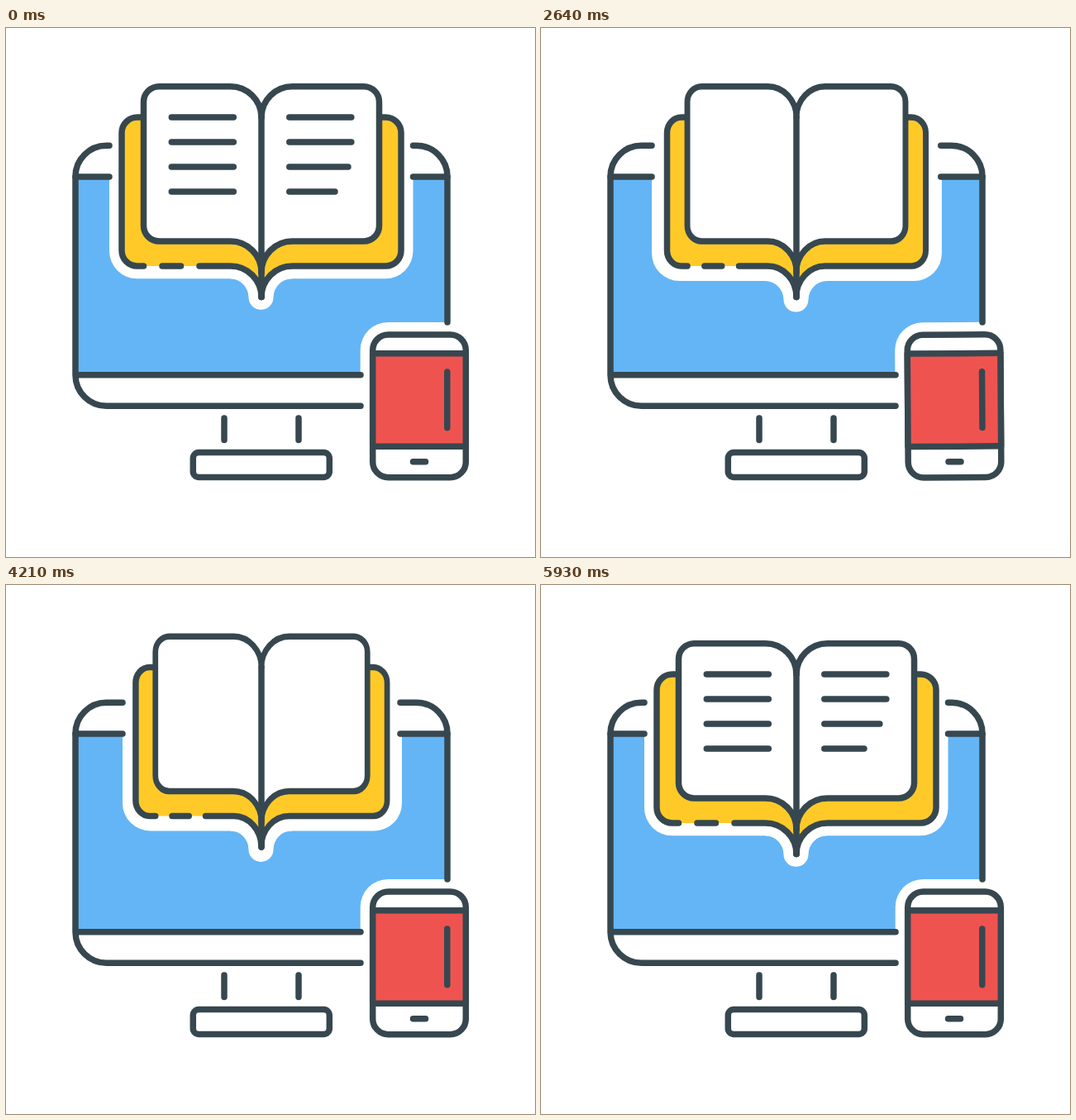
These frames come from a looping animation (640 px wide and 640 px high, 6000 ms). An HTML page without scripts:

```html
<!DOCTYPE html>
<html lang="en">
<head>
<meta charset="utf-8">
<title>Online reading</title>
<style>
  @property --hide { syntax: "<number>"; inherits: false; initial-value: 0; }
  @property --show { syntax: "<number>"; inherits: false; initial-value: 0; }

  :root { --ease: cubic-bezier(.333, 0, .667, 1); }
  html, body { margin: 0; width: 100%; height: 100%; overflow: hidden; background: #fff; }
  svg { display: block; width: 100%; height: 100%; }

  .ink { fill: none; stroke: #37474f; stroke-width: 7.5; stroke-linecap: round; stroke-linejoin: round; }
  .ink * { vector-effect: non-scaling-stroke; }
  .white { fill: #fff; }
  .yellow { fill: #ffca28; }
  .blue { fill: #64b5f6; }
  .red { fill: #ef5350; }
  .bare { stroke: none; }

  .lift, .squeeze, .halo, .halo rect, .bezel, .phone { animation: 6s var(--ease) infinite; }
  .lift { animation-name: lift; }
  .squeeze { animation-name: squeeze; }
  .halo { animation-name: halo-lift; }
  .halo rect { animation-name: halo-squeeze; }
  .bezel { animation-name: bezel; }
  .phone { animation-name: wiggle; }

  @keyframes lift {
    0%, 59.33%, 81.33%, 100% { translate: 0 0; }
    70.83%, 71.67% { translate: 0 -8.6px; }
  }
  @keyframes squeeze {
    0%, 37.92%, 83.5%, 100% { scale: 1 1; }
    47.08%, 74.33% { scale: .9 1; }
  }
  @keyframes halo-lift {
    0%, 39.05%, 80.83%, 100% { translate: 0 0; }
    48.2%, 59.33% { translate: 0 5px; }
    70.83%, 71.67% { translate: 0 -6px; }
  }
  @keyframes halo-squeeze {
    0%, 39.05%, 80.83%, 100% { x: 125px; width: 367.5px; }
    48.2%, 71.67% { x: 141px; width: 338px; }
  }
  @keyframes bezel {
    0%, 39.05%, 84%, 100% { d: path("M84 180A37.5 37.5 0 0 1 121.5 142.2H125M84 180H125M534 180A37.5 37.5 0 0 0 496.5 142.2H492.5M534 180H492.5"); }
    48.2%, 74.83% { d: path("M84 180A37.5 37.5 0 0 1 121.5 142.2H141M84 180H141M534 180A37.5 37.5 0 0 0 496.5 142.2H477M534 180H477"); }
  }
  @keyframes wiggle {
    0%, 43.08%, 69.67%, 100% { rotate: 0deg; }
    48.4%, 59.03% { rotate: -5deg; }
    53.72%, 64.35% { rotate: 5deg; }
  }

  /* Text lines: wiped away from the left, later drawn again from the left */
  .text line {
    stroke-dasharray: 1px 3px;
    stroke-dashoffset: calc((var(--show) - var(--hide)) * 1px);
    animation: hide 6s var(--ease) infinite, show 6s var(--ease) infinite;
    animation-delay: calc(var(--out) + var(--i) * 155ms - 6s), calc(var(--in) + var(--i) * 110ms - 6s);
  }
  .left { --out: 914ms; --in: 5035ms; }
  .right { --out: 1140ms; --in: 5270ms; }
  .text .third { animation-name: hide, show-third; animation-delay: calc(var(--out) + 310ms - 6s), 0s; }
  .text .fourth { animation-name: hide, show-fourth; animation-delay: calc(var(--out) + 465ms - 6s), 0s; }

  @keyframes hide {
    0% { --hide: 0; }
    9.17%, 55% { --hide: 1.02; }
    55.01%, 100% { --hide: 0; }
  }
  @keyframes show {
    0% { --show: 1.02; }
    9.17%, 58% { --show: 0; }
    58.01%, 100% { --show: 2.04; }
  }
  @keyframes show-third {
    0% { --show: .053; animation-timing-function: cubic-bezier(.333, .62, .667, 1); }
    1.27%, 45% { --show: 0; }
    45.01%, 91.5% { --show: 2.04; }
    91.51% { --show: 1.01; animation-timing-function: cubic-bezier(.333, 0, .667, .709); }
    98.83% { --show: .107; animation-timing-function: linear; }
    100% { --show: .053; }
  }
  @keyframes show-fourth {
    0% { --show: .267; animation-timing-function: cubic-bezier(.333, .571, .667, 1); }
    3.12%, 45% { --show: 0; }
    45.01%, 93.36% { --show: 2.04; }
    93.37% { --show: 1.01; animation-timing-function: cubic-bezier(.333, 0, .667, .553); }
    98.83% { --show: .36; animation-timing-function: linear; }
    100% { --show: .267; }
  }
</style>
</head>
<body>
<svg viewBox="0 0 640 640">
  <defs>
    <path id="page" d="M0 108A37.5 37.5 0 0 1 37.5 70.7H123.75a18.75 18.75 0 0 1 18.75 18.75V239.25a18.75 18.75 0 0 1-18.75 18.75H37.5A37.5 37.5 0 0 0 0 295.5"/>
    <path id="cover" d="M0 108H150.25a18.75 18.75 0 0 1 18.75 18.75V269.25a18.75 18.75 0 0 1-18.75 18.75H37.5A37.5 37.5 0 0 0 0 325.5"/>
  </defs>

  <rect class="blue" x="84" y="180" width="450" height="240"/>

  <g class="halo white">
    <rect x="125" y="120" width="367.5" height="183.3" rx="33.5"/>
    <path d="M271 300v3.3a22.5 22.5 0 0 1 22.5 22.5a15 15 0 0 0 30 0a22.5 22.5 0 0 1 22.5-22.5v-3.3z"/>
  </g>
  <g transform="translate(500 457.5)">
    <rect class="phone white" x="-71.3" y="-101.5" width="142.6" height="203" rx="33.5"/>
  </g>

  <g class="ink">
    <path class="bezel" d="M84 180A37.5 37.5 0 0 1 121.5 142.2H125M84 180H125M534 180A37.5 37.5 0 0 0 496.5 142.2H492.5M534 180H492.5"/>
    <path d="M84 180V420A37.5 37.5 0 0 0 121.5 457.3H429M84 419.8H429M534 180V356"/>
    <path d="M264 472V498.5M354 472V498.5"/>
    <rect x="226.3" y="513.5" width="165" height="30" rx="7"/>
  </g>

  <g transform="translate(309 0)">
    <g class="lift">
      <g class="squeeze ink">
        <use href="#cover" class="yellow"/>
        <use href="#cover" class="yellow bare" transform="scale(-1 1)"/>
        <path d="M-140 108H-150.25a18.75 18.75 0 0 0-18.75 18.75V269.25a18.75 18.75 0 0 0 18.75 18.75H-142.5M-120 288H-97.5M-75 288H-37.5A37.5 37.5 0 0 1 0 325.5"/>
        <use href="#page" class="white"/>
        <use href="#page" class="white" transform="scale(-1 1)"/>
        <path d="M0 108V325.5"/>
      </g>
    </g>
  </g>

  <g class="ink text">
    <g class="left">
      <line style="--i:0" pathLength="1" x1="200.3" x2="275.3" y1="108" y2="108"/>
      <line style="--i:1" pathLength="1" x1="200.3" x2="275.3" y1="138" y2="138"/>
      <line style="--i:2" pathLength="1" x1="200.3" x2="275.3" y1="168" y2="168"/>
      <line style="--i:3" pathLength="1" x1="200.3" x2="275.3" y1="198" y2="198"/>
    </g>
    <g class="right">
      <line style="--i:0" pathLength="1" x1="342.8" x2="417.8" y1="108" y2="108"/>
      <line style="--i:1" pathLength="1" x1="342.8" x2="417.8" y1="138" y2="138"/>
      <line class="third" pathLength="1" x1="342.8" x2="417.8" y1="168" y2="168"/>
      <line class="fourth" pathLength="1" x1="342.8" x2="417.8" y1="198" y2="198"/>
    </g>
  </g>

  <g transform="translate(500 457.5)">
    <g class="phone ink">
      <rect class="white" x="-56.3" y="-86.5" width="112.6" height="172.7" rx="18.75"/>
      <rect class="red" x="-56.3" y="-63.8" width="112.6" height="112.5"/>
      <path d="M33.8-41.5V26.2M-7.5 67.2H7.5"/>
    </g>
  </g>
</svg>
</body>
</html>
```
